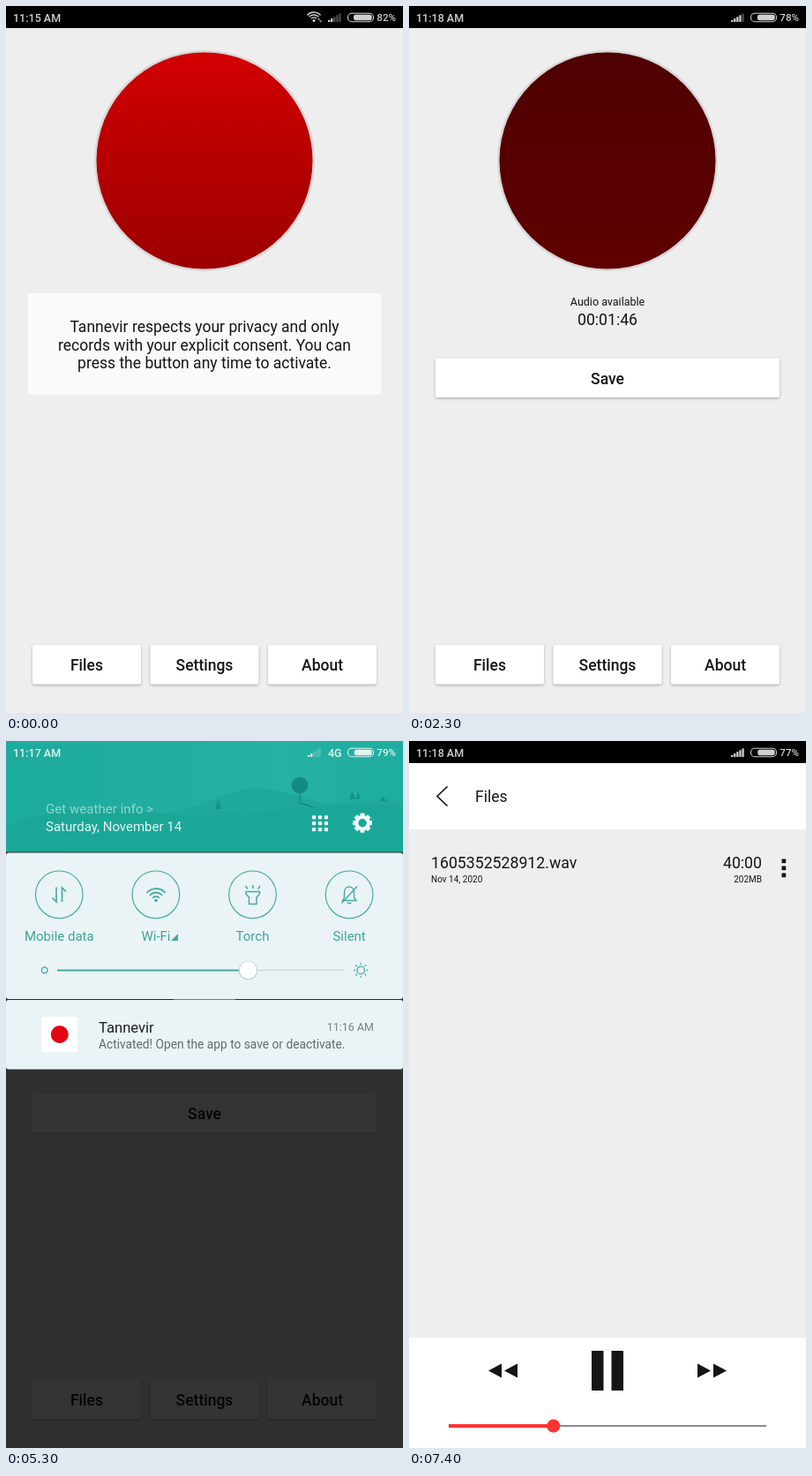
An HTML page with a canvas for the animation above (8000 ms loop, 450x800 px).

```html
<!DOCTYPE html>
<html lang="en">
<head>
<meta charset="utf-8">
<title>Voice recorder app</title>
<style>
html, body { margin: 0; width: 100%; height: 100%; overflow: hidden; background: #eee; }
canvas { display: block; width: 450px; height: 800px; }
</style>
</head>
<body>
<canvas id="stage" width="450" height="800"></canvas>
<script>
const ctx = document.getElementById('stage').getContext('2d');
const INK = '#151515', TEAL = '#43aba1', PANEL = '#eaf3f5', LIGHT = '#cfcfcf';
const APP = 'Tannevir';

function rect(x, y, w, h, color, radius = 0) {
  ctx.fillStyle = color;
  ctx.beginPath();
  ctx.roundRect(x, y, w, h, radius);
  ctx.fill();
}
function text(str, x, y, size, color = INK, align = 'left', weight = 400) {
  ctx.font = `${weight} ${size}px Roboto, sans-serif`;
  ctx.textAlign = align;
  ctx.fillStyle = color;
  ctx.fillText(str, x, y);
}
function disc(x, y, r, color) {
  ctx.fillStyle = color;
  ctx.beginPath();
  ctx.arc(x, y, r, 0, Math.PI * 2);
  ctx.fill();
}
function ring(x, y, r, color, width) {
  stroke(`M${x - r} ${y}a${r} ${r} 0 1 1 ${2 * r} 0a${r} ${r} 0 1 1 ${-2 * r} 0z`, color, width);
}
function stroke(path, color, width) {
  ctx.strokeStyle = color;
  ctx.lineWidth = width;
  ctx.stroke(new Path2D(path));
}
function fill(path, color) {
  ctx.fillStyle = color;
  ctx.fill(new Path2D(path));
}
function rays(x, y, count, r1, r2, color, width) {
  for (let i = 0; i < count; i++) {
    const a = i / count * Math.PI * 2, c = Math.cos(a), s = Math.sin(a);
    stroke(`M${x + r1 * c} ${y + r1 * s}L${x + r2 * c} ${y + r2 * s}`, color, width);
  }
}
function wifi(x, y, radii, color, width) {
  ctx.strokeStyle = color;
  ctx.lineWidth = width;
  for (const r of radii) {
    ctx.beginPath();
    ctx.arc(x, y, r, -Math.PI * 0.77, -Math.PI * 0.23);
    ctx.stroke();
  }
  disc(x, y - 0.5, width, color);
}

function statusBar(time, charge, bars, signalX, color = LIGHT, dim = '#4a4a4a') {
  text(time, 8, 17.5, 12.5, color, 'left', 500);
  for (let i = 0; i < 5; i++) {
    const h = 2 + i * 1.9;
    rect(signalX + i * 3.1, 18 - h, 2.3, h, i < bars ? color : dim);
  }
  ctx.strokeStyle = color;
  ctx.lineWidth = 1.1;
  ctx.beginPath();
  ctx.roundRect(387.5, 8.2, 29, 9.6, 4.5);
  ctx.stroke();
  const w = 24 * charge / 100 + 1;
  rect(414.7 - w, 9.8, w, 6.4, color, 2.5);
  text(charge + '%', 442, 17.2, 11.6, color, 'right', 500);
}

function button(label, x, y, w) {
  ctx.save();
  ctx.shadowColor = 'rgba(0,0,0,.28)';
  ctx.shadowBlur = 3;
  ctx.shadowOffsetY = 1.3;
  rect(x, y, w, 44.5, '#fff', 2);
  ctx.restore();
  text(label, x + w / 2, y + 29.2, 17.5, INK, 'center', 500);
}

function home(top, bottom) {
  rect(0, 0, 450, 800, '#eee');
  rect(0, 0, 450, 25, '#000');
  disc(225, 175, 125, '#d8d8d8');
  const shade = ctx.createLinearGradient(0, 52, 0, 298);
  shade.addColorStop(0, top);
  shade.addColorStop(1, bottom);
  disc(225, 175, 122.5, shade);
  button('Files', 30, 723, 123);
  button('Settings', 163.5, 723, 123);
  button('About', 297, 723, 123);
}

function idle() {
  home('#d20000', '#9b0000');
  statusBar('11:15 AM', 82, 2, 365);
  wifi(349, 17, [4, 7, 10], LIGHT, 1.5);
  fill('M353 15.5l1.5-2 1.5 2zm2 1h3l-1.5 2z', LIGHT);
  rect(25, 325, 400, 114.5, '#fafafa');
  [APP + ' respects your privacy and only',
    'records with your explicit consent. You can',
    'press the button any time to activate.'
  ].forEach((line, i) => text(line, 225, 369 + i * 20.5, 17.5, INK, 'center'));
}

function recorded() {
  home('#4f0000', '#5f0000');
  statusBar('11:18 AM', 78, 4, 365);
  text('Audio available', 225, 338.7, 12.5, INK, 'center');
  text('00:01:46', 225, 361.2, 17.6, INK, 'center');
  button('Save', 30, 398.5, 390);
}

function landscape() {
  const sky = ctx.createLinearGradient(0, 0, 450, 0);
  sky.addColorStop(0, '#1dab9d');
  sky.addColorStop(0.7, '#25b1a3');
  sky.addColorStop(1, '#1fad9f');
  rect(0, 0, 450, 125.5, sky);
  fill('M175 84C230 74 250 52 290 54C325 56 345 72 375 70C400 67 425 64 450 68V125H175z', '#1fa99b');
  fill('M0 96C50 76 110 72 160 80C220 90 280 82 330 76C380 71 420 70 450 76V125H0z', '#1ba798');
  fill('M237 77l3.5-11 3.5 11zM389 66l3.5-10 3.5 10zm7 0l3-9 3 9zM424 68l3-6 4 6z', '#149485');
  disc(333, 50, 9.3, '#118b7f');
  stroke('M333 56V70L348 75', '#118b7f', 1.4);
}

function toggles() {
  ['Mobile data', 'Wi-Fi', 'Torch', 'Silent'].forEach((label, i) => {
    const x = 60.3 + i * 109.6;
    ring(x, 173.8, 26.8, TEAL, 1.2);
    text(label, i === 1 ? 170 : x, 226, 15, '#3fa69c', 'center');
  });
  fill('M187 226h8v-8z', TEAL);
  stroke('M57 165.5V182L52.5 177.5M63.5 182V166L68 170.5', TEAL, 1.7);
  wifi(170, 181, [5, 9.5, 14], TEAL, 1.8);
  stroke('M272 170.5H287.5V173L284 177V184.5H275.5V177L272 173zM279.8 163V167M271.5 164L274 167.5M288 164L285.5 167.5', TEAL, 1.5);
  stroke('M381.5 180.5H397L394.5 177V171C394.5 163 383.5 163 383.5 171V177zM387 183.5H391.5M398 164.5L380.5 183.5', TEAL, 1.4);
}

function shade() {
  recorded();
  rect(0, 0, 450, 800, 'rgba(0,0,0,.795)');
  rect(0, 120, 450, 251, '#252c2c');
  landscape();
  statusBar('11:17 AM', 79, 2, 342, '#e2f4f1', '#58bfb4');
  text('4G', 365, 17.5, 12.5, '#e2f4f1', 'left', 500);
  text('Get weather info >', 45, 81.5, 15.1, '#92d5ce');
  text('Saturday, November 14', 45, 102, 15, '#e4f5f3');
  for (let i = 0; i < 9; i++)
    rect(347 + i % 3 * 6.9, 84.2 + Math.floor(i / 3) * 6.9, 4.2, 4.2, '#f0faf9', 1);
  rays(404, 92.7, 8, 7, 11, '#f0faf9', 5);
  ring(404, 92.7, 6.8, '#f0faf9', 4.2);

  rect(0, 126.5, 450, 165.5, PANEL, 3);
  toggles();
  ring(43.7, 259.3, 3.4, TEAL, 1.3);
  rect(58, 258.5, 216, 2, TEAL);
  rect(274, 258.8, 110, 1.3, '#c9d5d6');
  disc(274.5, 259.6, 10.7, '#c4cece');
  disc(274.5, 259.4, 9.8, '#fff');
  ring(402.2, 259.4, 4.2, TEAL, 1.3);
  rays(402.2, 259.4, 8, 6.3, 8.2, TEAL, 1.4);
  rect(190, 292, 70, 1, '#777');

  rect(0, 293, 450, 78.5, PANEL, 3);
  rect(40.5, 312, 40.5, 40, '#fff', 3);
  disc(60.8, 332, 10, '#e30613');
  text(APP, 105, 330.3, 16.6, '#1c1f1f');
  text('11:16 AM', 417, 328.4, 12.5, '#7a8181', 'right');
  text('Activated! Open the app to save or deactivate.', 105, 347.6, 13.75, '#646a6a');
}

function files() {
  rect(0, 0, 450, 800, '#eee');
  rect(0, 0, 450, 25, '#000');
  statusBar('11:18 AM', 77, 5, 365);
  rect(0, 25, 450, 75, '#fff');
  stroke('M43.5 51.5L32 62.5L43.5 73.5', INK, 1.7);
  text('Files', 75, 69.3, 17.5);
  text('1605352528912.wav', 25, 144, 17.7);
  text('Nov 14, 2020', 25, 159.6, 10);
  text('40:00', 400, 144, 17.7, INK, 'right');
  text('202MB', 400, 159.6, 10, INK, 'right');
  for (let i = 0; i < 3; i++) rect(422.5, 133.5 + i * 8, 4.7, 4.7, INK);

  rect(0, 675, 450, 125, '#fff');
  fill('M105 704.5v16l-15-8zM123 704.5v16l-15-8z', INK);
  fill('M327 704.5v16l15-8zM345 704.5v16l15-8z', INK);
  rect(207, 690, 13.5, 45, INK);
  rect(229.5, 690, 13.5, 45, INK);
  rect(163, 774.3, 242, 1.4, '#666');
  rect(45, 773, 118, 4, '#ff3434');
  disc(163.7, 775, 7.6, '#ff3434');
}

const LOOP = 8000;
const scenes = [[500, idle], [3500, recorded], [6500, shade], [LOOP, files]];

function frame() {
  const t = performance.now() % LOOP;
  scenes.find(([end]) => t < end)[1]();
  requestAnimationFrame(frame);
}
frame();
</script>
</body>
</html>
```
